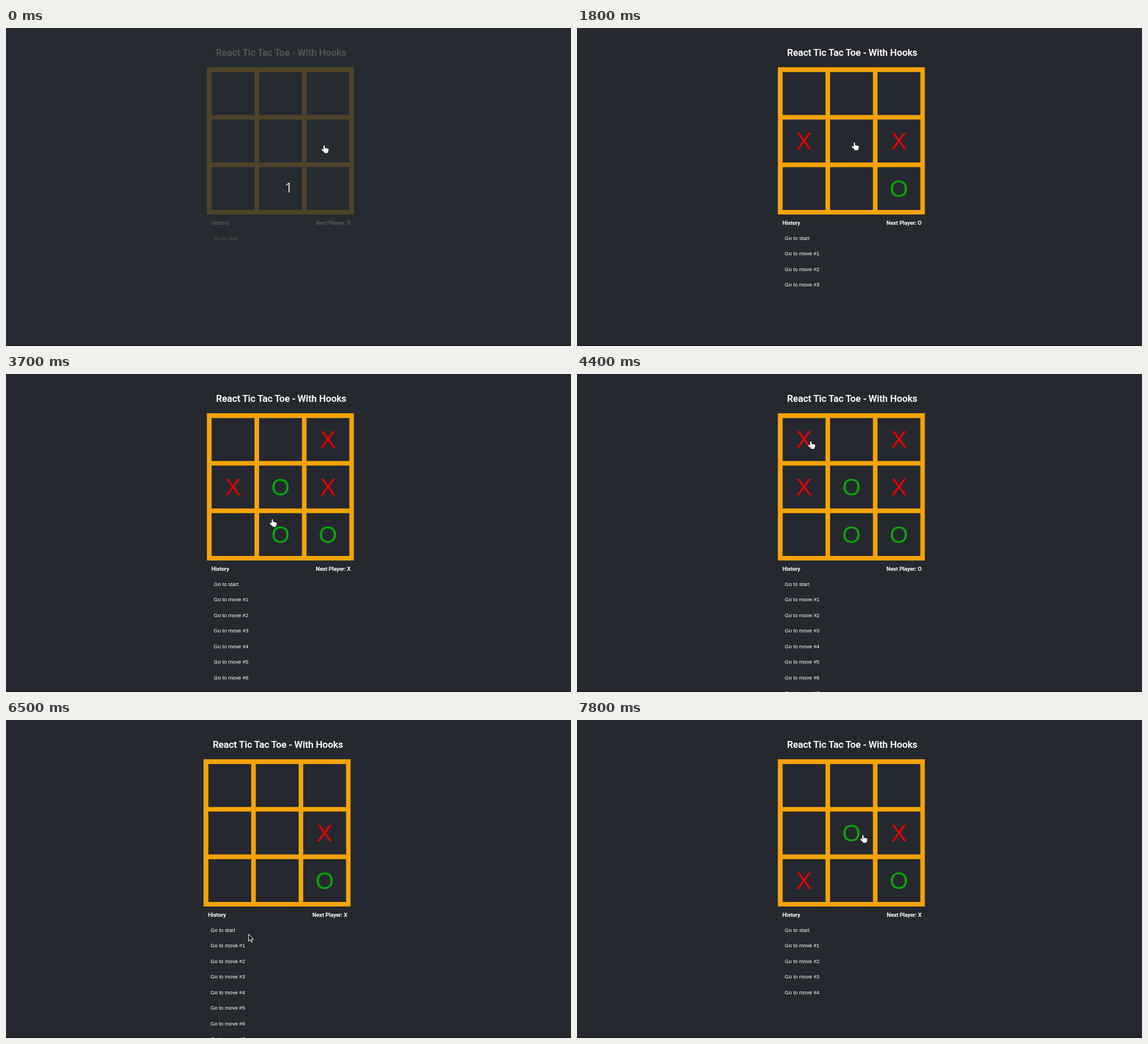
Animation of 998x561 px, one loop 8 s. Source, as an HTML page:

```html
<!DOCTYPE html>
<html lang="en">
<head>
<meta charset="utf-8">
<title>Tic Tac Toe</title>
<style>
html, body { margin: 0; width: 100%; height: 100%; overflow: hidden; background: #262830; }
svg { display: block; }
.head { font-family: Roboto, sans-serif; font-weight: 500; fill: #fff; stroke: #fff; stroke-width: .25px; }
.title { font-size: 16.7px; }
.label { font-size: 9.8px; }
.row { font: 9.36px "Liberation Sans", Arial, sans-serif; fill: #fff; }
.mark { font: 42px "Liberation Sans", Arial, sans-serif; text-anchor: middle; }
.count { font: 24px "Noto Sans", sans-serif; text-anchor: middle; fill: #d8d9da; }
</style>
</head>
<body>
<svg id="stage" width="998" height="561" viewBox="0 0 998 561">
  <rect id="back" width="998" height="561"/>
  <rect y="560" width="998" height="1" fill="#121317"/>
  <g id="page">
    <text class="head title" x="371" y="49">React Tic Tac Toe - With Hooks</text>
    <path id="board" fill="#f4a408" fill-rule="evenodd"/>
    <text class="head label" x="362.8" y="346.8">History</text>
    <text id="status" class="head label" x="608.7" y="346.8" text-anchor="end"></text>
  </g>
  <text id="count" class="count" x="499.3" y="290">1</text>
  <path id="hand" fill="#fff" d="M-1.1 1.1C-1.1-.2 1-.2 1 1.1V4.8L6.4 5.8Q7.8 6.2 7.8 7.5L7.3 10.5 6.4 11.8V13.6H.2V12L-4.2 8.4C-5 7.2-3.6 6.2-2.6 6.8L-1.1 7.8Z"/>
  <path id="arrow" fill="#15161a" stroke="#fff" d="M.5.8V13.2L3.3 10.5 5.4 15.2 7.3 14.3 5.3 9.8H9.2Z"/>
</svg>
<script>
const LOOP = 8000, STEP = 100, CELL = 75.7, PITCH = 83.8, LEFT = 363.2, TOP = 77.8;
const $ = id => document.getElementById(id);
const page = $('page');

// pointer moves: start, end, x, y, sag of the path
const moves = [
  [700, 800, 566, 262], [900, 1300, 402, 203, 15], [1500, 1800, 490, 202],
  [2000, 2600, 548, 114], [2800, 3200, 470.5, 256], [3700, 3900, 455, 166],
  [4000, 4300, 413, 118.5], [4500, 4900, 493, 127, 27], [5100, 5500, 460, 346],
  [5600, 5900, 412.5, 432], [6000, 6200, 411, 426], [6400, 6500, 428, 377],
  [6500, 7300, 432, 274], [7300, 7400, 506, 238], [7500, 7700, 505, 203]];

// a click hits whatever lay under the pointer one step earlier
const clicks = [700, 900, 1500, 2000, 2700, 3700, 4400, 5100, 6500, 7300, 7800];

const cellX = i => LEFT + i % 3 * PITCH;
const cellY = i => TOP + Math.floor(i / 3) * PITCH;
const rowY = i => 373.9 + i * 27.5;
const ease = u => 1 - (1 - u) ** 1.4;
const shiftOf = game => game.played.length > 7 ? -5.8 : 0;

function addText(cls, x, y, text) {
  const el = document.createElementNS('http://www.w3.org/2000/svg', 'text');
  el.setAttribute('class', cls);
  el.setAttribute('x', x);
  el.setAttribute('y', y);
  el.textContent = text;
  return page.appendChild(el);
}

const cells = [...Array(9).keys()];
const box = (x, y, s) => `M${x} ${y}h${s}v${s}h${-s}z`;
$('board').setAttribute('d', box(354.8, 69.3, 259.6) +
  cells.map(i => box(cellX(i), cellY(i), CELL)).join(''));
const marks = cells.map(i => addText('mark', cellX(i) + CELL / 2, cellY(i) + 52.3, ''));
const rows = cells.map(i => addText('row', 367, rowY(i), i ? 'Go to move #' + i : 'Go to start'));

function pointAt(t) {
  let x = 562, y = 207;
  for (const [from, to, toX, toY, sag = 0] of moves) {
    if (t <= from) break;
    const p = ease(Math.min(1, (t - from) / (to - from)));
    x += (toX - x) * p;
    y += (toY - y) * p + sag * Math.sin(Math.PI * p);
  }
  return [x, y];
}

// cell and history row under a point, -1 for none
function hit([px, y], game) {
  const x = px - shiftOf(game);
  const inside = (v, start, size) => v >= start && v <= start + size;
  return {
    cell: cells.findIndex(i => inside(x, cellX(i), CELL) && inside(y, cellY(i), CELL)),
    row: rows.findIndex((r, i) => i <= game.played.length &&
      inside(x, 363, i ? 69 : 52) && inside(y, rowY(i) - 13, 20))
  };
}

function click(game, t) {
  const { cell, row } = hit(pointAt(t - STEP), game);
  if (row >= 0) return { ...game, at: row };
  return { played: [...game.played.slice(0, game.at), cell], at: game.at + 1 };
}

const gameAt = t => clicks.filter(c => c <= t).reduce(click, { played: [], at: 0 });

function show(el, on) {
  el.style.display = on ? '' : 'none';
}

function draw(t) {
  const game = gameAt(t), { played, at } = game;
  const dim = t < 200;
  $('back').setAttribute('fill', dim ? '#262b31' : '#262830');
  page.setAttribute('opacity', dim ? .2 : 1);
  page.setAttribute('transform', `translate(${shiftOf(game)} 0)`);
  show($('count'), dim);

  marks.forEach((m, i) => {
    const n = played.slice(0, at).indexOf(i);
    m.textContent = n < 0 ? '' : n % 2 ? 'O' : 'X';
    m.setAttribute('fill', n % 2 ? '#0aa50a' : '#e60000');
  });
  rows.forEach((r, i) => show(r, i <= played.length));
  $('status').textContent = at === 8 ? 'Winner: O' : 'Next Player: ' + (at % 2 ? 'O' : 'X');

  const point = pointAt(t);
  const { cell, row } = hit(point, game);
  const hover = cell >= 0 || row >= 0;
  show($('hand'), hover);
  show($('arrow'), !hover);
  $(hover ? 'hand' : 'arrow').setAttribute('transform', `translate(${point})`);
}

function tick() {
  draw(Math.floor(performance.now() % LOOP / STEP) * STEP);
  requestAnimationFrame(tick);
}
tick();
</script>
</body>
</html>
```
